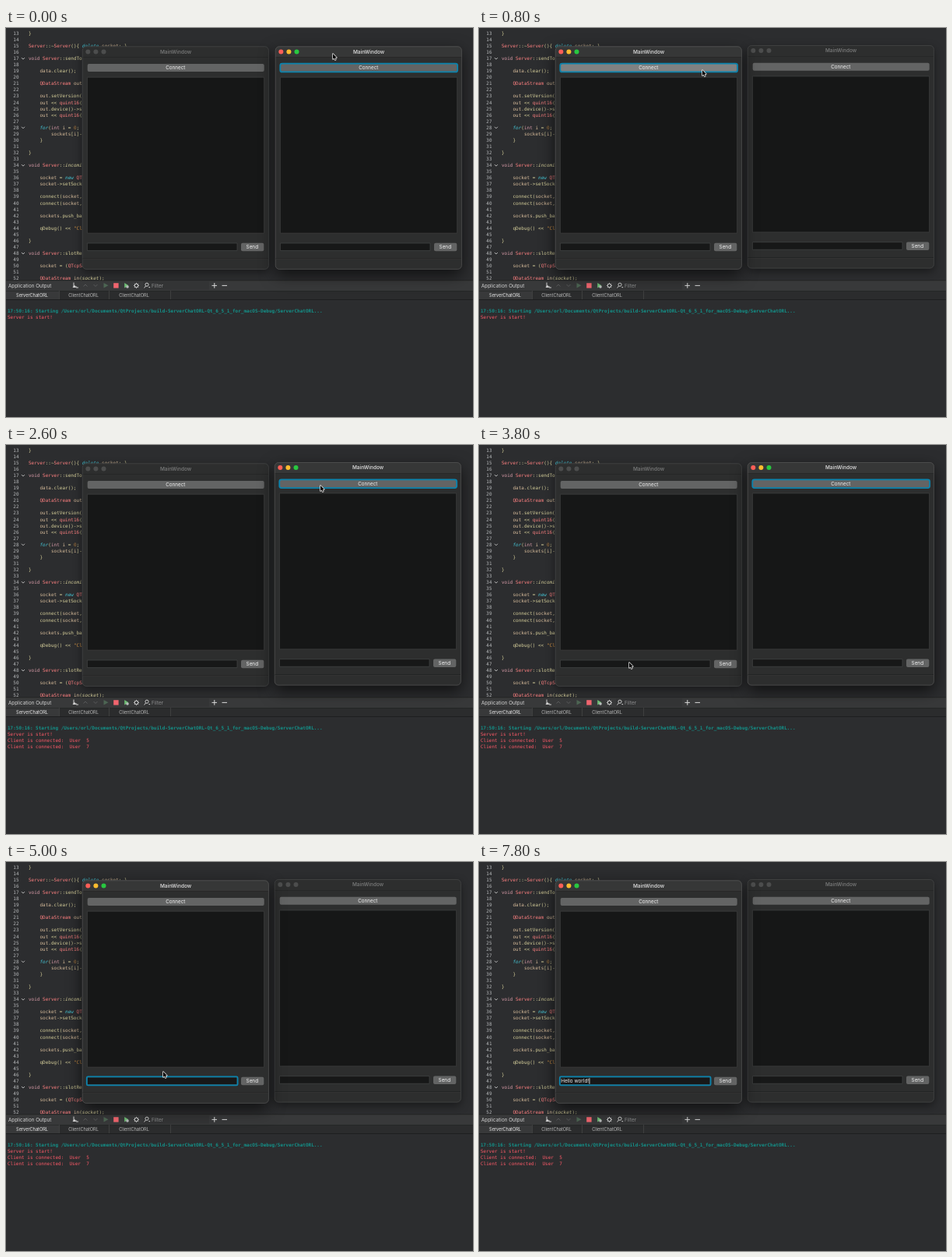
Animation, 600 px wide and 499 px high, one loop 8000 ms. Source, as an HTML page with a canvas:

```html
<!DOCTYPE html>
<html lang="en">
<head>
<meta charset="utf-8">
<title>Chat client and server</title>
<style>
html, body { margin: 0; height: 100%; overflow: hidden; background: #2c2d2f; }
canvas { display: block; width: 600px; height: 499px; }
</style>
</head>
<body>
<canvas id="stage"></canvas>
<script>
const LOOP = 8000, STEP = 200;
const canvas = document.getElementById('stage');
const ctx = canvas.getContext('2d');
const ratio = window.devicePixelRatio || 1;
canvas.width = 600 * ratio;
canvas.height = 499 * ratio;

const MONO = '"DejaVu Sans Mono", monospace';
const SANS = 'Inter, "Liberation Sans", sans-serif';
const CHAR = 3.62;
const INK = {
  d: '#d6cf9a', t: '#ff8080', v: '#d69aa7', k: '#45c6d6',
  m: '#d6bb9a', s: '#d69545', n: '#a8763c'
};

// Each line: number, indent, then colour key and text in turn
const CODE = [
  [13, 0, 'd', '}'],
  [15, 0, 't', 'Server', 'd', '::~', 't', 'Server', 'd', '(){ ', 'k', 'delete ', 'm', 'socket', 'd', '; }'],
  [17, 0, 'v', 'void ', 't', 'Server', 'd', '::sendToClient'],
  [19, 4, 'm', 'data', 'd', '.clear();'],
  [21, 4, 't', 'QDataStream ', 'm', 'out'],
  [23, 4, 'm', 'out', 'd', '.setVersion('],
  [24, 4, 'm', 'out ', 'd', '<< ', 't', 'quint16', 'd', '('],
  [25, 4, 'm', 'out', 'd', '.device()->s'],
  [26, 4, 'm', 'out ', 'd', '<< ', 't', 'quint16', 'd', '('],
  [28, 4, 'k', 'for', 'd', '(', 'v', 'int ', 'm', 'i ', 'd', '= ', 'n', '0', 'd', ';'],
  [29, 8, 'm', 'sockets', 'd', '[', 'm', 'i', 'd', ']->'],
  [30, 4, 'd', '}'],
  [32, 0, 'd', '}'],
  [34, 0, 'v', 'void ', 't', 'Server', 'd', '::', 'i', 'incoming'],
  [36, 4, 'm', 'socket ', 'd', '= ', 'k', 'new ', 't', 'QTcp'],
  [37, 4, 'm', 'socket', 'd', '->setSocket'],
  [39, 4, 'd', 'connect(', 'm', 'socket', 'd', ','],
  [40, 4, 'd', 'connect(', 'm', 'socket', 'd', ','],
  [42, 4, 'm', 'sockets', 'd', '.push_back'],
  [44, 4, 'd', 'qDebug() << ', 's', '"Client'],
  [46, 0, 'd', '}'],
  [48, 0, 'v', 'void ', 't', 'Server', 'd', '::slotReady'],
  [50, 4, 'm', 'socket ', 'd', '= (', 't', 'QTcpSocket'],
  [52, 4, 't', 'QDataStream ', 'm', 'in', 'd', '(', 'i', 'socket', 'd', ');']
];

// Pointer path: time, x, y
const POINTER = [
  [0, 420, 33], [200, 420, 33], [800, 287, 54], [1200, 287, 54],
  [2000, 404, 52], [2600, 404, 52], [3600, 193, 279], [4200, 193, 279], [5000, 202, 269]
];

function text(str, x, y, color, font, align = 'left') {
  ctx.font = font;
  ctx.fillStyle = color;
  ctx.textAlign = align;
  ctx.textBaseline = 'alphabetic';
  ctx.fillText(str, x, y);
}

const sans = (str, x, y, color, size = 6.4, align = 'left', weight = 400) =>
  text(str, x, y, color, `${weight} ${size}px ${SANS}`, align);

function rect(x, y, w, h, color) {
  ctx.fillStyle = color;
  ctx.fillRect(x, y, w, h);
}

function box(x, y, w, h, r, fill, stroke, width = 1) {
  ctx.beginPath();
  ctx.roundRect(x, y, w, h, r);
  if (fill) { ctx.fillStyle = fill; ctx.fill(); }
  if (stroke) { ctx.strokeStyle = stroke; ctx.lineWidth = width; ctx.stroke(); }
}

function line(color, width, ...points) {
  ctx.beginPath();
  for (let i = 0; i < points.length; i += 2) ctx.lineTo(points[i], points[i + 1]);
  ctx.strokeStyle = color;
  ctx.lineWidth = width;
  ctx.stroke();
}

function shape(color, ...points) {
  ctx.beginPath();
  for (let i = 0; i < points.length; i += 2) ctx.lineTo(points[i], points[i + 1]);
  ctx.closePath();
  ctx.fillStyle = color;
  ctx.fill();
}

function circle(x, y, r, fill, stroke) {
  ctx.beginPath();
  ctx.arc(x, y, r, 0, 7);
  if (fill) { ctx.fillStyle = fill; ctx.fill(); }
  if (stroke) { ctx.strokeStyle = stroke; ctx.lineWidth = 1; ctx.stroke(); }
}

function drawEditor() {
  const rowY = n => 25 + (n - 15) * 8.06;
  for (let n = 13; n <= 52; n++) text(n, 16.5, rowY(n), '#b4b6b8', `6px ${MONO}`, 'right');
  for (const n of [17, 28, 34, 48]) {
    const y = rowY(n) - 3;
    line('#c8c8c8', 0.9, 20, y, 22, y + 2, 24, y);
  }
  for (const [n, indent, ...parts] of CODE) {
    let x = 29 + indent * CHAR;
    for (let i = 0; i < parts.length; i += 2) {
      const key = parts[i], str = parts[i + 1];
      const style = key === 'i' || key === 'k' ? 'italic ' : '';
      text(str, x, rowY(n), INK[key] || INK.d, `${style}6px ${MONO}`);
      x += str.length * CHAR;
    }
  }
}

function drawToolbar() {
  rect(0, 324, 600, 13, '#38393a');
  rect(0, 323.5, 600, 0.7, '#1f2021');
  sans('Application Output', 3, 332.7, '#d4d4d4', 6.3);

  line('#cfcfcf', 1, 87, 326.5, 87, 332, 91, 332);
  shape('#cfcfcf', 85.5, 333, 88, 329.5, 90, 333);
  line('#cfcfcf', 1, 90, 333, 93, 333);
  line('#58595a', 1, 99.5, 331.5, 102, 329, 104.5, 331.5);
  line('#58595a', 1, 112.5, 329, 115, 331.5, 117.5, 329);
  shape('#4d6553', 125.5, 327, 131.5, 330.3, 125.5, 333.6);
  rect(138.2, 327.2, 6.4, 6.4, '#f0656e');
  shape('#6fbd75', 152.2, 327, 157.5, 330.3, 152.2, 333.6);
  circle(156, 332, 1.8, '#b9bcbc');
  circle(167.5, 330.4, 2.2, null, '#cfcfcf');
  for (let i = 0; i < 8; i++) {
    const c = Math.cos(i * Math.PI / 4), s = Math.sin(i * Math.PI / 4);
    line('#cfcfcf', 1, 167.5 + 2.3 * c, 330.4 + 2.3 * s, 167.5 + 3.5 * c, 330.4 + 3.5 * s);
  }
  box(176, 325.2, 85, 10.6, 0, '#333435');
  circle(181, 329.2, 2.1, null, '#cfcfcf');
  line('#cfcfcf', 1, 179.5, 331, 177.5, 333.5);
  shape('#cfcfcf', 183, 332, 185.5, 332, 184.2, 333.6);
  sans('Filter', 187, 332.7, '#8d8e8f');
  line('#d8d8d8', 1, 264.5, 330.4, 271, 330.4);
  line('#d8d8d8', 1, 267.8, 327, 267.8, 333.7);
  line('#d8d8d8', 1, 277.5, 330.4, 284, 330.4);
}

function drawOutput(t) {
  rect(0, 337, 600, 12, '#2b2c2d');
  rect(0, 337, 68, 12, '#38393a');
  rect(0, 337, 600, 0.6, '#222324');
  for (const x of [68, 132, 211]) rect(x, 337, 0.7, 11.5, '#48494a');
  sans('ServerChatORL', 33.5, 344.8, '#f0f0f0', 5.6, 'center');
  sans('ClientChatORL', 99.5, 344.8, '#bcbcbc', 5.6, 'center');
  sans('ClientChatORL', 164.5, 344.8, '#bcbcbc', 5.6, 'center');
  rect(0, 348, 600, 1, '#1d1e1f');
  rect(0, 349, 600, 150, '#2c2d2f');

  text('17:50:16: Starting /Users/orl/Documents/QtProjects/build-ServerChatORL-Qt_6_5_1_for_macOS-Debug/ServerChatORL...',
    2, 364.5, '#149189', `bold 6px ${MONO}`);
  const log = ['Server is start!'];
  if (t >= 1000) log.push('Client is connected:  User  5');
  if (t >= 2400) log.push('Client is connected:  User  7');
  log.forEach((str, i) => text(str, 2, 372.6 + i * 8, '#ff5a69', `6px ${MONO}`));
}

function drawWindow(dx, dy, { active, focus, pressed, message = '' }) {
  ctx.save();
  ctx.translate(dx, dy);

  ctx.save();
  ctx.shadowColor = active ? 'rgba(0,0,0,.65)' : 'rgba(0,0,0,.45)';
  ctx.shadowBlur = (active ? 20 : 12) * ratio;
  ctx.shadowOffsetY = (active ? 7 : 4) * ratio;
  box(98, 23.5, 239.5, 286, 5, '#2d2e2e');
  ctx.restore();

  if (active) box(98, 23.5, 239.5, 14, [5, 5, 0, 0], '#363737');
  rect(98, 37.3, 239.5, 0.6, '#222323');
  box(98.2, 23.8, 239.2, 285.6, 5, null, active ? '#565757' : '#484949', 0.7);

  const lights = active ? ['#ff5f57', '#febc2e', '#28c840'] : Array(3).fill('#4c4d4d');
  lights.forEach((color, i) => circle(105.3 + i * 10.1, 30.4, 3, color));
  sans('MainWindow', 218, 32.6, active ? '#d2d2d2' : '#747575', 6.4, 'center', 600);

  const ring = active && focus;
  box(104.7, 46, 227, 10, 2, pressed ? '#808181' : '#636464');
  if (ring === 'button') box(104.3, 45.6, 227.8, 10.8, 2.5, null, '#0b83ad', 1.8);
  sans('Connect', 217.8, 53.3, '#f2f2f2', 6.3, 'center');

  box(104.4, 63.2, 227.2, 200, 0, '#161717', '#3d3e3e', 0.8);
  box(104.4, 276, 192.6, 9.6, 0, '#171818', '#414242', 0.8);
  if (ring === 'field') box(103.8, 275.4, 193.8, 11, 1.5, null, '#0b83ad', 1.8);
  box(302, 275.8, 29.3, 10.4, 2, '#636464');
  sans('Send', 316.3, 283.3, '#f2f2f2', 6.4, 'center');

  if (message) {
    sans(message, 105.2, 283.2, '#f4f4f4');
    rect(105.6 + ctx.measureText(message).width, 277.3, 0.8, 7.4, '#ffffff');
  }
  rect(98.5, 295.6, 238.5, 0.8, '#1f2020');
  rect(98.5, 296.4, 238.5, 0.5, '#3a3b3b');
  ctx.restore();
}

function drawPointer(t) {
  if (t >= 5200) return;
  let i = POINTER.findIndex(p => p[0] > t);
  if (i < 0) i = POINTER.length - 1;
  const [t0, x0, y0] = POINTER[i - 1], [t1, x1, y1] = POINTER[i];
  const p = Math.min(1, (t - t0) / (t1 - t0));
  const ease = p * p * (3 - 2 * p);
  ctx.save();
  ctx.translate(x0 + (x1 - x0) * ease, y0 + (y1 - y0) * ease);
  ctx.beginPath();
  for (const [x, y] of [[0, 0], [0, 7], [1.6, 5.6], [2.7, 8], [3.8, 7.5], [2.8, 5.2], [4.9, 5.1]]) ctx.lineTo(x, y);
  ctx.closePath();
  ctx.lineJoin = 'round';
  ctx.lineWidth = 1.4;
  ctx.strokeStyle = '#f4f4f4';
  ctx.stroke();
  ctx.fillStyle = '#000';
  ctx.fill();
  ctx.restore();
}

function typedText(t) {
  if (t < 5200) return '';
  const count = t < 6400 ? 1 + (t - 5200) / 200 : 7 + (t - 6400) / 250;
  return 'Hello world!'.slice(0, Math.floor(count));
}

function draw(t) {
  ctx.setTransform(ratio, 0, 0, ratio, 0, 0);
  rect(0, 0, 600, 499, '#2c2d2f');
  drawEditor();

  const leftActive = (t >= 800 && t < 2200) || t >= 4000;
  const left = () => drawWindow(0, 0, {
    active: leftActive,
    focus: t >= 4000 ? 'field' : 'button',
    pressed: t === 800,
    message: typedText(t)
  });
  const moved = t >= 200;
  const right = () => drawWindow(moved ? 247 : 248, moved ? -1.3 : 0, {
    active: !leftActive,
    focus: 'button',
    pressed: t === 2200
  });

  drawToolbar();
  drawOutput(t);
  if (leftActive) { right(); left(); } else { left(); right(); }
  drawPointer(t);
}

function tick() {
  const t = performance.now() % LOOP;
  draw(Math.floor(t / STEP) * STEP);
  requestAnimationFrame(tick);
}
tick();
</script>
</body>
</html>
```
